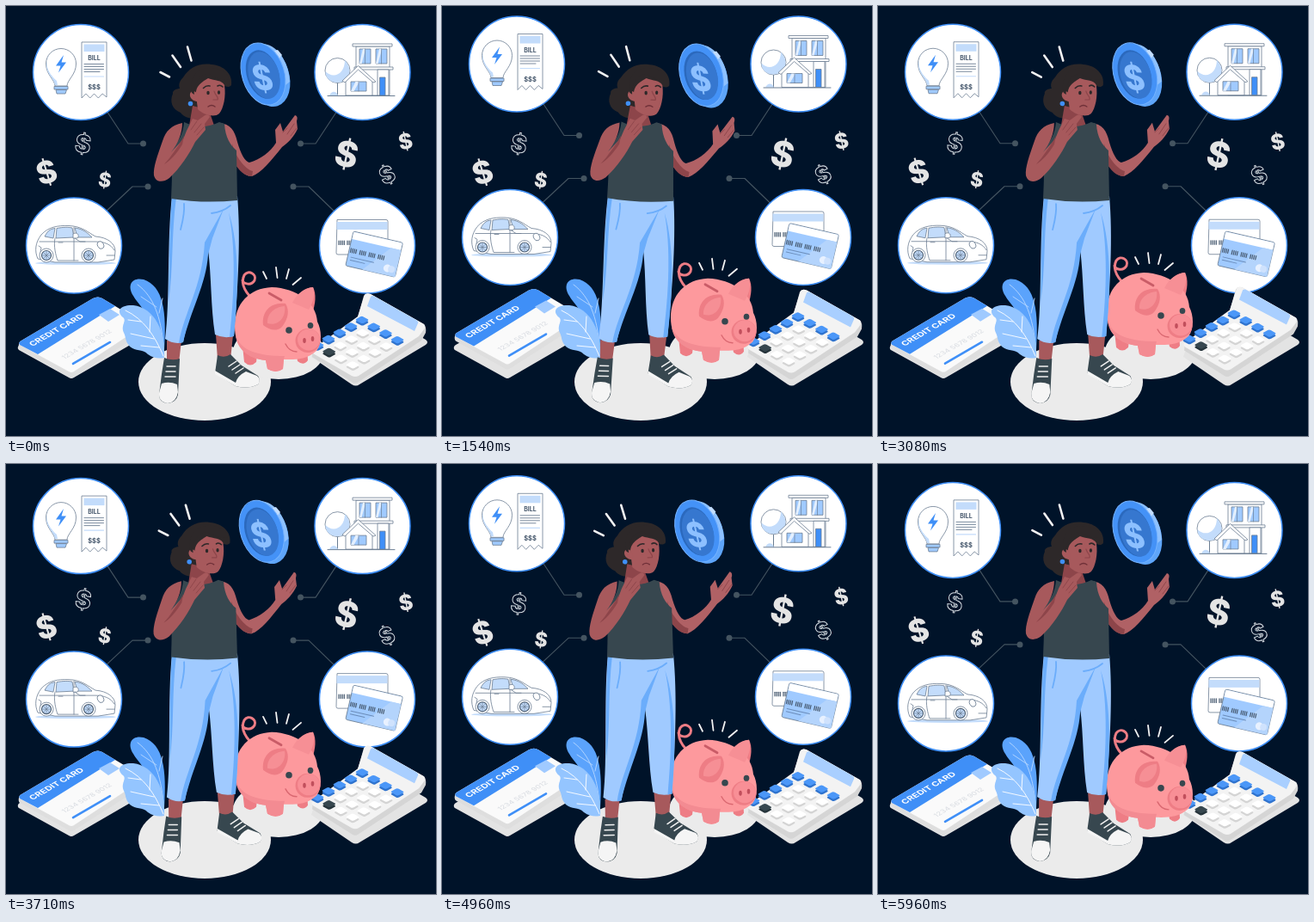
An HTML page for the animation above (6 s loop, 500 by 500 pixels).

```html
<!DOCTYPE html>
<html lang="en">
<head>
<meta charset="utf-8">
<title>Personal expenses</title>
<style>
html, body { margin: 0; width: 100%; height: 100%; overflow: hidden; background: #001329; }
svg { display: block; width: 100vw; height: 100vh; }
text { font-family: Inter, "Liberation Sans", sans-serif; font-weight: 700; }
</style>
</head>
<body>
<svg id="stage" viewBox="0 0 500 500"></svg>
<script>
const stage = document.getElementById('stage');
const LOOP = 6000;
const BLUE = '#3f8ff7', SKY = '#a0caff', PALE = '#c3dcfb', INK = '#6b7d92', DARK = '#37474f';
const SKIN = '#a7595c', SHADE = '#8d454a', HAIR = '#2d2829', PINK = '#fd999d', ROSE = '#ee7d85';

const path = (d, fill, more = '') => `<path d="${d}" fill="${fill}" ${more}/>`;
const line = (d, color, width = 1) =>
  `<path d="${d}" fill="none" stroke="${color}" stroke-width="${width}" stroke-linecap="round" stroke-linejoin="round"/>`;
const sketch = (d, fill = '#fff') => path(d, fill, `stroke="${INK}" stroke-width=".8" stroke-linejoin="round"`);
const rect = (x, y, w, h, fill, more = '') =>
  `<rect x="${x}" y="${y}" width="${w}" height="${h}" fill="${fill}" ${more}/>`;
const oval = (x, y, rx, ry, fill, more = '') =>
  `<ellipse cx="${x}" cy="${y}" rx="${rx}" ry="${ry}" fill="${fill}" ${more}/>`;
const label = (x, y, size, fill, str, more = '') =>
  `<text x="${x}" y="${y}" font-size="${size}" fill="${fill}" ${more}>${str}</text>`;
const group = (id, ...parts) => `<g id="${id}">${parts.join('')}</g>`;

function bubble(x, y, wire, dotX, dotY, art) {
  return line(wire, '#445460', 1.1) + `<circle cx="${dotX}" cy="${dotY}" r="3.5" fill="#445460"/>` +
    `<circle cx="${x}" cy="${y}" r="55.5" fill="#fff" stroke="${BLUE}" stroke-width="1.5"/>` + art;
}

function dollar(x, y, size, tilt, hollow) {
  const paint = hollow ? 'stroke="#d5dae0" stroke-width="1"' : '';
  return `<g transform="translate(${x} ${y}) rotate(${tilt})">` +
    label(0, size * .365, size, hollow ? 'none' : '#e4e4e4', '$', `text-anchor="middle" style="font-weight:800" ${paint}`) + '</g>';
}

function bill() {
  let zigzag = 'M88 42H117V106';
  for (let i = 1; i <= 6; i++) zigzag += `L${117 - i * 4.83} ${i % 2 ? 102 : 107}`;
  const rows = [67.5, 70.5, 73.5, 76.5].map((y, i) => line(`M91 ${y}H${i === 3 ? 109 : 113.5}`, INK, .9)).join('');
  return sketch('M57 93C57 86 46.500 80 46.500 67A17.500 17.500 0 0 1 81.500 67C81.500 80 71 86 71 93Z') +
    path('M50 56C44 69 50 79 59 87L60 92H57C56 84 46 79 47 66Z', PALE) +
    sketch('M56 93.500H72V97H56ZM58 97.500H70.500L69 102H59Z', SKY) +
    path('M67 57L58 69.500H63.500L61 77.500L70 65.500H64.500Z', BLUE) +
    sketch(zigzag + 'Z') + rect(90.5, 44.5, 24, 8.5, PALE) + rows +
    line('M91 82H113.500', PALE, 1.2) +
    label(102.5, 63, 7, '#44566b', 'BILL', 'text-anchor="middle"') +
    label(102.5, 97, 7.5, '#44566b', '$$$', 'text-anchor="middle"');
}

function pane(x, y, w, h) {
  return sketch(`M${x} ${y}h${w}v${h}h${-w}Z`, SKY) +
    path(`M${x + w * .3} ${y}h${w * .25}L${x + w * .2} ${y + h}h${-w * .2}Z`, '#e3efff') +
    line(`M${x + w / 2} ${y}v${h}`, INK, .7);
}

function house() {
  return sketch('M407 47H446V104H407Z') + sketch('M403 44H449V47H403Z') +
    pane(411, 50, 13, 17) + pane(430, 50, 13, 17) +
    sketch('M405 71H450V74H405Z') + sketch('M432 74H445V104H432Z') +
    sketch('M434.500 83H441V104H434.500Z', BLUE) +
    line('M385.500 75V104M385 88L379 81M386 84L391 78', INK) +
    sketch('M371 75A14.500 14.500 0 1 1 400 75A14.500 14.500 0 1 1 371 75Z') +
    path('M371.500 76C380 85 394 80 394 63C405 75 398 89 385 89C377 89 371 83 371.500 76Z', PALE) +
    sketch('M395 85L409.500 72L426 85V104H395Z') +
    sketch('M391 87L409.500 69.500L430 88L427 89L409.500 74L394 89Z') +
    pane(401, 88, 18, 11) +
    path('M376 104C379 98 384 99 386 104Z', PALE) + line('M374 104.500H452', INK);
}

function wheel(x, y) {
  return sketch(`M${x - 8} ${y}a8 8 0 1 1 16 0a8 8 0 1 1 -16 0Z`, '#fff') +
    `<circle cx="${x}" cy="${y}" r="5.500" fill="${PALE}" stroke="#4c5e73" stroke-width="1.2"/>` +
    line(`M${x - 4} ${y}h8M${x} ${y - 4}v8M${x - 3} ${y - 3}l6 6M${x + 3} ${y - 3}l-6 6`, INK, .7);
}

function car() {
  return oval(81, 299, 47, 2, PALE) +
    sketch('M37 294C33 285 34 275 41 266C49 257 60 255 73 255.500C88 256 95 263 104 268C118 269 127 276 127 285L126 295L107 298H57Z') +
    sketch('M45 268C49 260 53 259 57 258.500L55 270Z', PALE) +
    sketch('M59 258.500C67 257 72 257 77 258L79 269L58 270Z', PALE) +
    sketch('M80 258C90 259 96 265 100 269L83 269Z', PALE) +
    line('M79 257V296M57 270C55 279 58 290 60 296H84M39 274H104C114 274 122 277 126 284M80 270L86 274H92M61 275H66', INK, .8) +
    sketch('M78 265C83 262 86 267 83 270H78Z') +
    oval(110, 278, 3.5, 4.5, '#fff', `stroke="${INK}" stroke-width=".8" transform="rotate(-25 110 278)"`) +
    line('M117 290H126M38 279L41 281L40 286', INK, .8) +
    wheel(47, 290) + wheel(96, 290);
}

function cards() {
  const digits = x => [0, 1, 2, 3].map(i => line(`M${x + i * 2.1} -1v4.500`, '#475a70', 1.2)).join('');
  const numbers = [7, 18, 29, 40].map(digits).join('');
  return sketch('M385 248.500H442Q444 248.500 444 250.500V289H386Q384 289 384 287Z') +
    rect(384.5, 251, 59, 9, PALE) +
    `<g transform="translate(380 274)">${digits(7)}${digits(17)}</g>` +
    `<g transform="translate(404 262) rotate(13)">` +
    rect(0, 0, 59, 41, SKY, `rx="2" stroke="${INK}" stroke-width=".8"`) +
    path('M.5 2Q.5 .5 2 .5H57Q58.500 .5 58.500 2V9H.5Z', '#fff') +
    path('M20 41L47 9H59V41Z', '#b4d4fc') +
    `<g transform="translate(-5 21)">${numbers}</g>` + line('M4 30H31M4 33.500H21', '#6b8db9') +
    oval(48, 33, 4.5, 4.5, '#e8f1ff') + oval(53, 33, 4, 4, '#cfe2fd') + '</g>';
}

function creditCard() {
  return path('M18 391L101 341Q107 338 112 341L162 371V378L79 431Q76 433 73 431L16 399Q14 397 15 393Z', '#dedede') +
    path('M18 389L101 340Q107 337 112 340L162 370L79 425Q76 427 73 425L16 394Q14 391 18 389Z', '#fafafa') +
    path('M18 389L101 340Q107 337 112 340L127 349L37 405L16 394Q14 391 18 389Z', BLUE) +
    `<g transform="matrix(.87 -.5 .72 .53 31 396)">${label(0, 0, 10.3, '#fff', 'CREDIT CARD')}</g>` +
    path('M108 359L121 352L132 359L119 367Z', SKY) +
    `<g transform="matrix(.87 -.5 .72 .53 68 411)">${label(0, 0, 8.5, '#dcdfe4', '1234 5678 9012', 'style="font-weight:500"')}</g>` +
    line('M78 416L121 391', BLUE, 2.6);
}

function leaves() {
  return path('M184 400C187 355 183 326 160 318C147 315 140 324 148 337C153 346 160 350 164 363Z', '#5ba3fc') +
    line('M183 394C180 362 172 338 153 324M178 357L182 340M175 350L157 338', '#b9d8ff', .9) +
    path('M184 409C186 379 173 351 148 348C134 347 127 354 136 362C141 366 133 371 137 380C140 386 138 389 144 396C151 402 158 398 165 405C172 410 178 410 184 409Z', '#94c5ff') +
    line('M183 407C173 383 160 364 139 354M167 379L168 361M172 387L145 381M178 397L157 395M157 367L142 365', '#fff', .9);
}

function calculator() {
  const key = (a, b) => {
    const x = 414 + 13 * (a - 3) + 13.7 * b, y = 365 - 7.3 * (a - 3) + 7.7 * b;
    const dark = a === -1 && b === 1, blue = b === 0 || a === 3;
    const [top, side] = dark ? [DARK, '#26343b'] : blue ? ['#4b97f8', '#2f73ce'] : ['#fff', '#d4d4d4'];
    const tile = (dy, fill) => `<g transform="matrix(13 -7.300 13.700 7.700 ${x} ${y + dy})">${rect(-.31, -.31, .62, .62, fill, 'rx=".14"')}</g>`;
    return tile(2.5, side) + tile(0, top);
  };
  let keys = '';
  for (let b = 0; b < 4; b++) for (let a = 3; a >= -1; a--) keys += key(a, b);
  return path('M357 399L409 362L416 337Q418 333 424 335L486 370Q489 373 488 380L483 389L410 437Q406 440 402 437L356 408Z', '#d5d5d5') +
    path('M357 399L409 361L417 336Q419 333 424 335L486 370Q488 372 486 376L480 384L410 430Q406 432 402 430L357 404Q354 401 357 399Z', '#f3f3f3') +
    path('M424 338Q426 336 429 338L477 365Q480 367 479 369L475 378L420 349Z', '#a9cfff') + keys;
}

function pig() {
  return line('M291 343C279 336 272 323 277 313C282 306 292 312 289 319C285 326 276 323 275 319', ROSE, 3) +
    line('M299 309L303 317M314 304L315.500 316M329 306L326 317M343 316L333.500 324', '#f2f2f2', 1.8) +
    path('M275 395L277 414Q284 421 291 414L293 398ZM337 402L339 413Q346 419 351 412L350 396Z', ROSE) +
    path('M338 340C341 332 350 327 357 327C361 334 360 347 356 357Z', ROSE) +
    path('M266 373C266 346 283 328 309 327C338 328 361 345 362 367C367 376 368 393 361 401C349 412 336 411 323 411L322 422Q314 428 304 422L302 412C280 410 266 396 266 373Z', PINK) +
    path('M267 382C272 402 296 407 324 407L323 411L322 422Q314 428 304 422L302 412C281 410 268 398 267 382Z', '#f38b92') +
    path('M299 371C297 356 307 344 325 346C330 354 328 364 321 373C315 379 306 377 299 371Z', ROSE) +
    path('M304 369C303 359 311 350 324 349C326 361 317 373 304 369Z', '#f68f95') +
    path('M333 345C339 333 348 328 357 327C360 337 356 347 352 353Z', '#f68f95') +
    line('M306 334L320 342', '#c95c67', 2.8) +
    oval(351, 389, 14.5, 14, ROSE, 'transform="rotate(-12 351 389)"') +
    oval(352, 388, 13, 12.5, '#f88f96') +
    oval(347, 389, 1.8, 3, '#c14f5c') + oval(356.5, 387, 1.8, 3, '#c14f5c') +
    oval(329, 377, 3.8, 3.8, DARK) + oval(354, 371.5, 3.3, 3.6, DARK) +
    line('M325 393C328 399 333 402 338 402', '#d96770', 1.4);
}

function coin() {
  const disc = (x, y, rx, ry, fill, more = '') =>
    oval(x, y, rx, ry, fill, `transform="rotate(-18 ${x} ${y})" ${more}`);
  return disc(304.5, 81, 24.5, 37, '#5ea5fa') +
    path('M293 44C313 41 329 63 330 88L325 92C326 65 310 45 293 44Z', '#8ec1ff') +
    path('M316 51L321 57L316 63L309 53Z', '#c2ddff') +
    disc(299, 79, 24.5, 37, '#4492f7', 'stroke="#74b2ff" stroke-width="1"') +
    disc(298.5, 79.5, 18.5, 29, '#2b69bd') + disc(300, 80.5, 17.5, 28, '#3677cf') +
    `<g transform="translate(298 83) rotate(-12) skewY(14) scale(.84 1)">` +
    label(0, 15, 41, '#8dc0ff', '$', 'text-anchor="middle" style="font-weight:800"') + '</g>';
}

function shoes() {
  return path('M187 389H204L201 415H187ZM244 382L264 383L261 411H246Z', SKIN) +
    path('M184 409Q193 413 202 410L200 452Q198 461 188 462Q178 461 178 452L181 428Z', DARK) +
    path('M181 439Q190 436 199 440L200 449Q198 461 188 462Q177 460 178 450Z', '#f5f5f5') +
    path('M246 406Q254 410 261 405L274 418L293 430Q296 435 293 440Q282 446 267 442L243 427Z', DARK) +
    path('M243 424L267 438Q269 430 279 425L292 430Q297 435 293 440Q282 446 267 442L243 428Z', '#f5f5f5') +
    line('M187 419H197M186 425H197M185 431H197M259 419L268 413M263 423L272 417M267 427L276 421', '#f1f1f1', 1.5);
}

function woman() {
  return line('M179.500 77L190 82.500M193.500 57.500L203 71M211 47.500L215.500 63.500', '#f2f2f2', 2.6) + shoes() +
    path('M193 221H269C273 267 270 325 265 384Q253 387 243 382C238 350 239 315 235 283C232 322 214 351 206 391Q195 394 185 387C191 343 187 274 193 221Z', SKY) +
    path('M235 289C233 323 215 353 206 391L201 392C207 356 228 327 231 275L253 236L240 270ZM193 222L198 222C192 267 195 303 189 344C190 300 190 260 193 222ZM265 384L260 385C266 330 267 280 259 240C272 280 270 337 265 384Z', '#6badfb') +
    line('M207 230C208 241 205 252 203 260M239 241C248 240 255 237 261 232', '#6badfb', 1.8) +
    path('M206 83C213 72 224 66 239 68C253 69 264 79 262 92C258 97 252 91 247 91L236 120C229 134 209 133 203 124C193 120 190 111 194 102C193 98 199 96 202 96C200 90 203 86 206 83Z', HAIR) +
    path('M217 116L236 121L242 139Q228 153 213 139Z', SHADE) +
    path('M221 104C220 92 229 88 235 84C243 87 251 86 254 92C256 105 253 119 248 125C243 130 230 127 223 120Z', SKIN) +
    path('M223 111C214 111 211 101 217 99Q223 99 224 107Z', SKIN) +
    path('M219 103C218 88 227 78 236 79C245 85 254 87 261 85C256 73 240 69 226 74C215 80 214 93 216 101Z', HAIR) +
    line('M229.500 95.500Q233 92 237 93M246 93Q249 91 252 94', HAIR, 1.6) +
    oval(235, 101, 1.7, 2.3, HAIR) + oval(247.5, 100.5, 1.6, 2.2, HAIR) +
    line('M242 99C243 104 248 106 246 109L241 109', SHADE, 1.2) +
    line('M235 117Q239 114 243 117', '#6f3038', 1.4) +
    oval(214.5, 113.5, 2.8, 2.8, BLUE) +
    path('M248 136C261 137 266 145 269 158C273 172 278 181 283 182C295 179 308 169 314 159L313 144L319 136L322 146L336 127Q340 128 338 134L339 143C335 152 327 160 321 164C308 180 297 194 286 198C275 198 266 184 260 173Z', '#b06165') +
    path('M263 160C266 174 278 190 287 192L286 198C275 198 267 186 262 176Z', SHADE) +
    line('M322 147L327 142M327 149L335 137M331 151L338 142', SHADE, .9) +
    path('M207 135Q228 145 248 135L254 137C255 153 261 162 268 168L269 226Q230 230 192 224C193 203 194 184 191 168C201 158 206 148 207 135Z', DARK) +
    path('M205 136C192 139 186 145 182 157C176 174 171 188 172 197C174 205 182 206 190 200C202 189 214 171 220 158L232 144L231 137L237 129Q235 124 230 128L223 133L217 131L210 145L206 155L192 170C200 160 205 148 205 136Z', SKIN) +
    path('M190 177C198 166 203 159 207 151L205 161C199 171 190 181 184 184Z', SHADE) +
    line('M222 134L215 144M227 137L219 147M230 141L222 150', SHADE, .9) + coin();
}

stage.innerHTML =
  group('bubbles',
    bubble(87, 77, 'M117 122L142 160H159', 159.5, 160, bill()),
    bubble(414.5, 77, 'M385 122L360 160H343', 342.5, 160, house()),
    bubble(79, 278.5, 'M116 239L147 210H165', 165, 210, car()),
    bubble(420, 278.5, 'M382 239L352 210H334', 334, 210, cards())) +
  group('dollars',
    dollar(47, 193, 36, -17), dollar(89.5, 160, 28, 8, true), dollar(115, 202, 23, 8),
    dollar(396, 172, 41, 12), dollar(464.5, 157, 25, -12), dollar(443, 196, 26, -25, true)) +
  oval(231, 437, 77, 45, '#ebebeb') + oval(317, 402, 53, 32, '#ebebeb') +
  path('M16 394L104 345L167 381L79 432Q76 434 73 432L15 400Q12 397 16 394Z', '#e3e3e3') +
  path('M357 402L433 356L488 388Q492 391 488 394L411 440Q407 443 402 440L355 408Z', '#e3e3e3') +
  group('card', creditCard()) + leaves() +
  group('calc', calculator()) + group('pig', pig()) + group('woman', woman());

const part = id => document.getElementById(id);
const moving = Object.fromEntries(['bubbles', 'dollars', 'card', 'calc', 'pig', 'woman'].map(id => [id, part(id)]));
const pose = (id, value) => moving[id].setAttribute('transform', value);

// Rises from 0 to 1 and back once per period, turning a little quicker at the bottom.
function rise(t, period, snap) {
  const s = Math.abs(Math.sin(Math.PI * t / period));
  return s * s * (1 - snap) + s * snap;
}

function draw(t) {
  const float = -9.5 * rise(t, LOOP / 2, .25);
  const lift = rise(t, LOOP, .4);
  const swing = Math.sin(2 * Math.PI * t / LOOP);
  pose('bubbles', `translate(0 ${float})`);
  pose('card', `translate(0 ${float})`);
  pose('calc', `translate(0 ${-7.5 * lift})`);
  pose('pig', `translate(0 ${-17 * lift})`);
  pose('dollars', `rotate(${Math.sin(4 * Math.PI * t / LOOP)} 250 185)`);
  pose('woman', `rotate(${swing} 230 225)`);
}

function tick() {
  draw(performance.now() % LOOP);
  requestAnimationFrame(tick);
}
tick();
</script>
</body>
</html>
```
